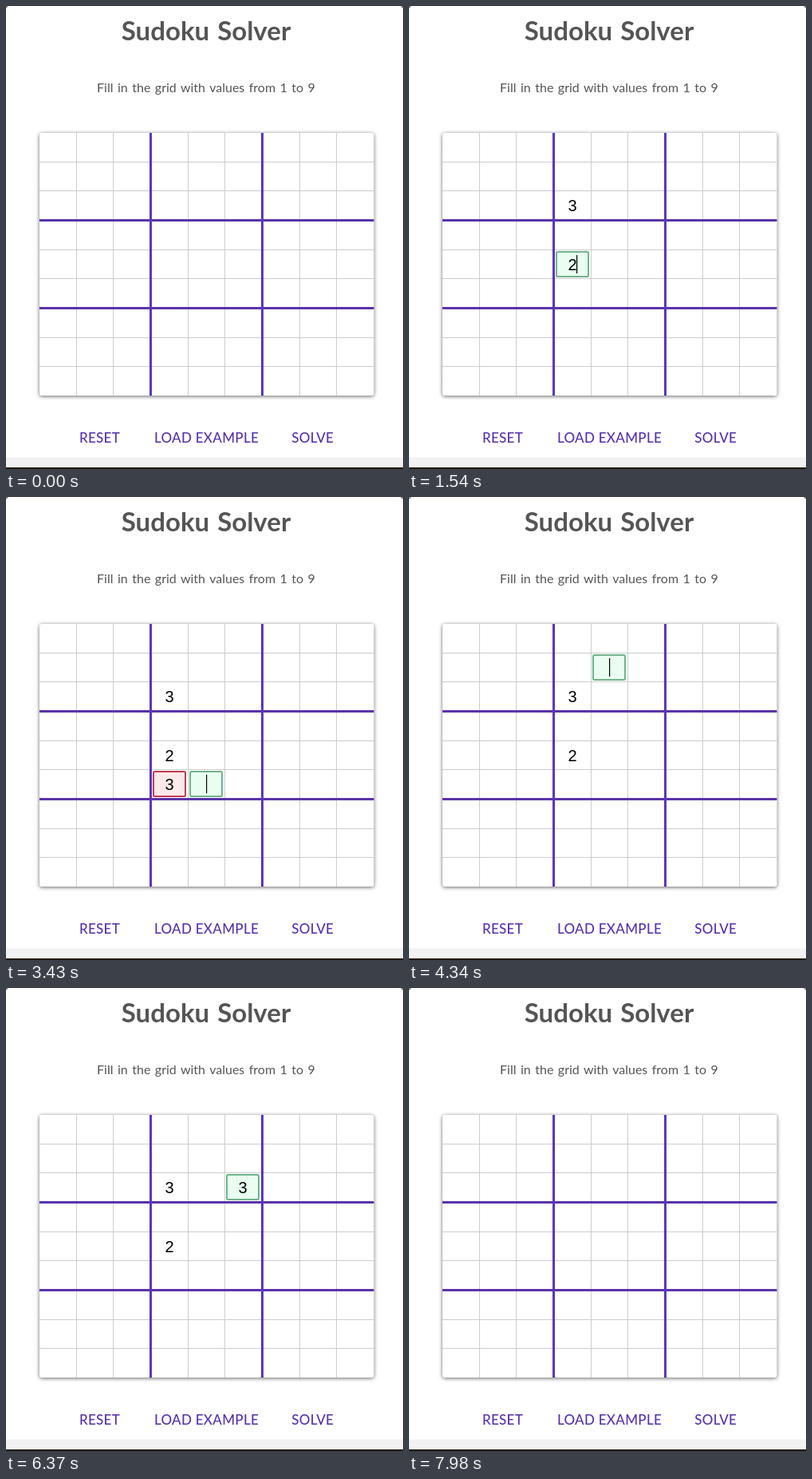
An HTML page for the animation above (8000 ms loop, 498 by 580 pixels).

```html
<!DOCTYPE html>
<html lang="en">
<head>
<meta charset="utf-8">
<title>Sudoku Solver</title>
<style>
  html, body { margin: 0; width: 100%; height: 100%; overflow: hidden; background: #fff; }
  svg { display: block; width: 498px; height: 580px; }
  text { text-anchor: middle; font-family: Lato, "Open Sans", sans-serif; }
  .title { font-size: 33px; font-weight: 700; word-spacing: 2px; fill: #555; }
  .hint { font-size: 16px; word-spacing: 1.4px; fill: #555; }
  .button { font-size: 17px; font-weight: 500; letter-spacing: .3px; fill: #5632b0; }
  .digit { font: 20px "Liberation Sans", Arial, sans-serif; fill: #000; }
  .board { fill: #fff; filter: drop-shadow(0 1px 2.5px rgba(0, 0, 0, .6)); }
  .thin { stroke: #ccc; }
  .thick { stroke-width: 3; }
  .across { stroke: #5b34aa; }
  .down { stroke: #5a35c4; }
  .box { stroke-width: 2; }
  .focus { stroke: #70b48a; fill: #e9fef1; }
  .bad { stroke: #c23b52; fill: #fde9ea; }
</style>
</head>
<body>
<svg viewBox="0 0 498 580">
  <rect width="498" height="580" fill="#fff"/>
  <path d="M0 0H3L0 3ZM498 0h-3l3 3Z" fill="#777"/>
  <text class="title" x="251" y="43">Sudoku Solver</text>
  <text class="hint" x="251" y="108">Fill in the grid with values from 1 to 9</text>
  <rect class="board" x="42" y="159" width="419.5" height="329" rx="3"/>
  <g id="grid"></g>
  <g id="cells"></g>
  <text class="button" x="117.5" y="547">RESET</text>
  <text class="button" x="251.5" y="547">LOAD EXAMPLE</text>
  <text class="button" x="384.7" y="547">SOLVE</text>
  <rect y="565.5" width="498" height="12.5" fill="#f2f2f2"/>
  <rect y="578" width="498" height="2" fill="#211b0c"/>
</svg>
<script>
const LOOP = 8000, BLINK = 500, RESET = 7560;
const cols = [42, 88, 134, 181, 228, 274, 321, 368, 414];
const rows = [159, 195, 231, 268, 305, 341, 378, 415, 451];

// Times in ms: focused, typed, left, and gone (value removed); bad = rejected on leaving.
const entries = [
  { row: 2, col: 3, value: 3, focus: 490, typed: 770, left: 1120, gone: RESET },
  { row: 4, col: 3, value: 2, focus: 1120, typed: 1400, left: 2170, gone: RESET },
  { row: 5, col: 3, value: 3, focus: 2170, typed: 2590, left: 3150, gone: 3850, bad: true },
  { row: 5, col: 4, focus: 3150, left: 4200 },
  { row: 1, col: 4, value: 3, focus: 4200, typed: 4690, left: 5180, gone: 5880, bad: true },
  { row: 2, col: 5, value: 3, focus: 5180, typed: 5740, left: 6440, gone: 7000, bad: true },
  { row: 2, col: 4, focus: 6440, left: RESET }
];

function add(parent, tag, attrs) {
  const el = document.createElementNS("http://www.w3.org/2000/svg", tag);
  for (const key in attrs) el.setAttribute(key, attrs[key]);
  return parent.appendChild(el);
}

const show = (el, on) => { el.style.display = on ? "" : "none"; };

function drawGrid(thick) {
  const grid = document.getElementById("grid");
  for (let i = 1; i < 9; i++) {
    if ((i % 3 === 0) !== thick) continue;
    const kind = thick ? "thick" : "thin";
    add(grid, "path", { class: kind + " across", d: `M42 ${rows[i] + .5}H461.5` });
    add(grid, "path", { class: kind + " down", d: `M${cols[i] + .5} 159V488` });
  }
}

function buildCell(entry) {
  const cells = document.getElementById("cells");
  const x = cols[entry.col] + (entry.col === 3 ? 3 : 2), y = rows[entry.row] + 2;
  entry.mid = x + 21;
  entry.box = add(cells, "rect", { x: x + 1, y: y + 1, width: 40, height: 31, rx: 1.5 });
  entry.digit = add(cells, "text", { class: "digit", x: entry.mid, y: y + 24 });
  entry.digit.textContent = entry.value || "";
  entry.caret = add(cells, "rect", { y: y + 5, width: 1.2, height: 23 });
}

function drawCell(entry, t) {
  const focused = t >= entry.focus && t < entry.left;
  const filled = t >= entry.typed && t < entry.gone;
  const bad = entry.bad && filled && t >= entry.left;
  const since = t - (filled ? entry.typed : entry.focus);
  show(entry.box, focused || bad);
  entry.box.setAttribute("class", bad ? "box bad" : "box focus");
  show(entry.digit, filled);
  show(entry.caret, focused && since % (2 * BLINK) < BLINK);
  entry.caret.setAttribute("x", entry.mid + (filled ? 5 : 0));
}

function frame() {
  const t = performance.now() % LOOP;
  entries.forEach(entry => drawCell(entry, t));
  requestAnimationFrame(frame);
}

const style = document.createElement("style");
style.textContent = ".thin.across, .thin.down { stroke: #ccc; }";
document.head.append(style);
drawGrid(false);
drawGrid(true);
entries.forEach(buildCell);
frame();
</script>
</body>
</html>
```
